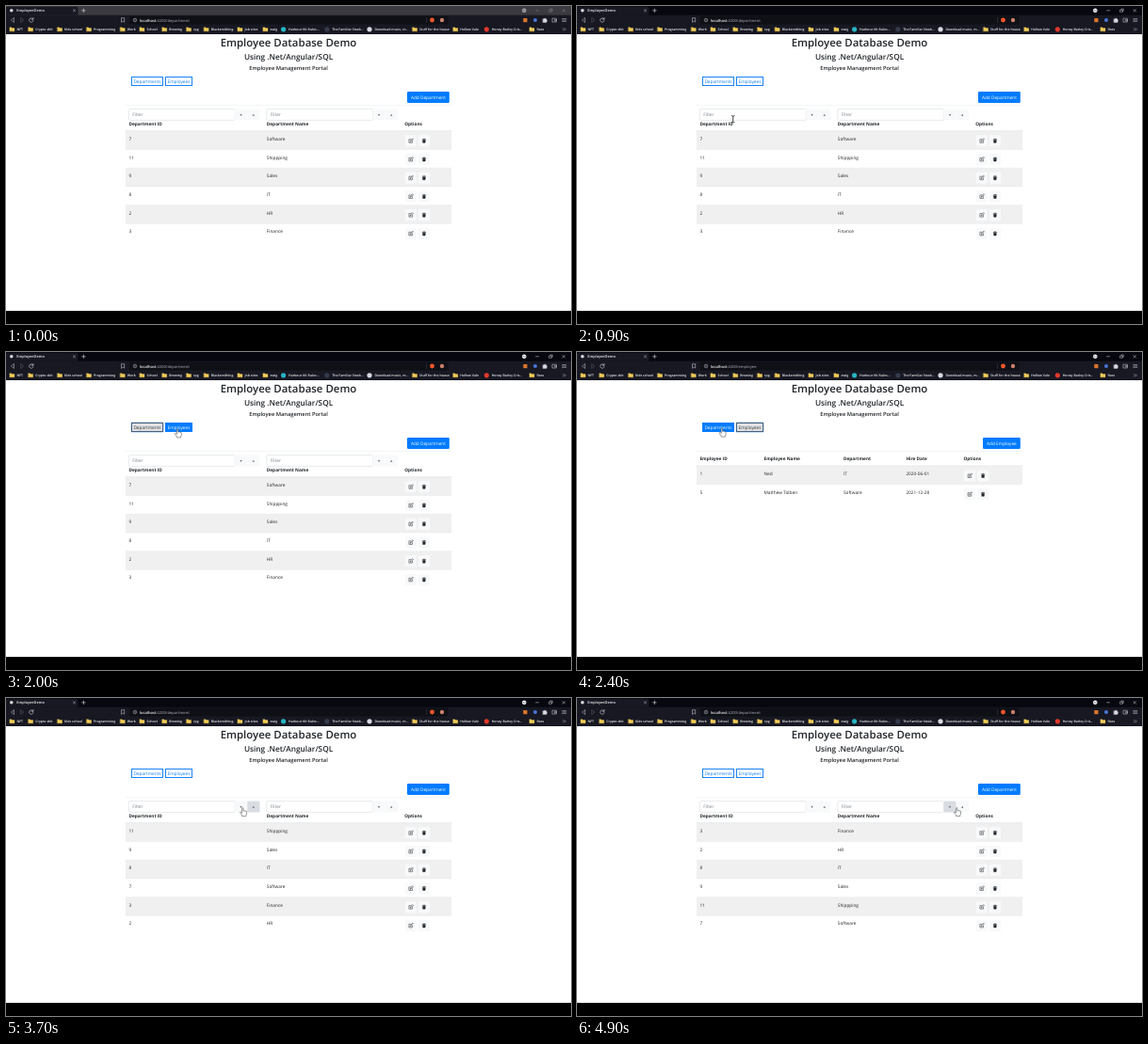
An HTML page for the animation above (5000 ms loop, 600 px wide and 338 px high).

```html
<!DOCTYPE html>
<html lang="en">
<head>
<meta charset="utf-8">
<title>EmployeeDemo</title>
<style>
  html, body { margin: 0; width: 100%; height: 100%; overflow: hidden; background: #fff; }
  svg { display: block; width: 100vw; height: 100vh; }
  text { font-family: "Open Sans", "Noto Sans", sans-serif; text-rendering: geometricPrecision; white-space: pre; }
  #chrome text { font-weight: 600; }
</style>
</head>
<body>
<svg viewBox="0 0 600 338" preserveAspectRatio="none">
  <g id="chrome"></g>
  <g id="page"></g>
  <g id="cursor"></g>
</svg>
<script>
const BLUE = '#007bff', INK = '#212529', LINE = '#dee2e6';
const $ = id => document.getElementById(id);

const rect = (x, y, w, h, fill, extra = '') =>
  `<rect x="${x}" y="${y}" width="${w}" height="${h}" fill="${fill}" ${extra}/>`;
const path = (d, stroke, w = 0.6, fill = 'none') =>
  `<path d="${d}" stroke="${stroke}" stroke-width="${w}" fill="${fill}" stroke-linecap="round" stroke-linejoin="round"/>`;
const dot = (x, y, r, fill, extra = '') => `<circle cx="${x}" cy="${y}" r="${r}" fill="${fill}" ${extra}/>`;
const text = (s, x, y, size = 4.75, fill = INK, extra = '') =>
  `<text x="${x}" y="${y}" font-size="${size}" fill="${fill}" ${extra}>${s}</text>`;
const bold = (s, x, y) => text(s, x, y, 4.75, INK, 'font-weight="700"');
const mid = (s, x, y, size, fill, weight = 400) =>
  text(s, x, y, size, fill, `text-anchor="middle" font-weight="${weight}"`);

// Browser frame
const folder = x => path(`M${x} 22.8h1.9l.6.7h2.5v3.3h-5z`, '#f5d469', 0.3, '#f3cc55');

const folders = [
  [4, 'NFT'], [23.7, 'Crypto shit'], [54.6, 'Kids school'], [85.6, 'Programming'],
  [121.3, 'Work'], [142, 'School'], [165.8, 'Brewing'], [191.6, 'rpg'],
  [210.2, 'Blacksmithing'], [246, 'Job sites'], [273, 'ewig'],
  [431.6, 'Stuff for the house'], [474.8, 'Hollow Vale'], [556, 'fixes']
];
const links = [
  [294.6, '#27b5c4', 'Harbour Kit Rules...'], [340.8, '#343b4d', 'The Familiar Nook...'],
  [386, '#d8dae0', 'Download music, m...'], [510.3, '#e2382c', 'Honey Barley Cris...']
];

function drawChrome(active, route) {
  const strip = active ? '#06070f' : '#3a3a40', bar = '#171822';
  const ctl = active ? '#e0e1e8' : '#8b8b92';
  let s = rect(0, 0, 600, 30, bar) + rect(0, 0, 600, 9.7, strip) +
    path('M0 9.8V2q0-1.2 1.2-1.2H75q1.4 0 1.4 1.4v7.6z', 'none', 0, bar) +
    dot(5.8, 4.8, 1.8, '#d9d9df') + text('EmployeeDemo', 11.3, 6.3, 3.9, '#ececf2') +
    path('M71.4 3.7l2.2 2.2m0-2.2l-2.2 2.2', '#c8c9d2', 0.5) +
    path('M82.4 3v3.6m-1.8-1.8h3.6', '#e0e0e8', 0.6) +
    dot(550.3, 4.8, 2.3, active ? '#f1f1f4' : '#a5a5aa') + path('M549.3 4.4l1 1 1-1', '#23242e', 0.5) +
    path('M562.7 4.8h3', ctl, 0.5) +
    path('M577 4h2.3v2.3h-2.3zM578 4v-1h2.3v2.3h-1', ctl, 0.45) +
    path('M591 3.5l2.6 2.6m0-2.6l-2.6 2.6', ctl, 0.5);

  s += path('M8.2 12.8L5.4 15l2.8 2.2z', '#cfd0d8', 0.5) +
    path('M16 12.8l2.8 2.2-2.8 2.2z', '#62646f', 0.5) +
    path('M28.6 13.7a2.2 2.2 0 1 0 .4 1.9M29 12.5v1.7h-1.7', '#d8d9e0', 0.6) +
    path('M122.9 12.7h2.8v4.4l-1.4-1.1-1.4 1.1z', '#d0d1d9', 0.55) +
    rect(131, 10.6, 338.5, 8.8, '#0f1016', 'rx="1"') +
    dot(137, 15, 1.8, 'none', 'stroke="#c6c7cf" stroke-width=".5"') +
    path('M137 14.8v1M137 14v.05', '#c6c7cf', 0.5) +
    `<text x="141.8" y="16.5" font-size="4.05" fill="#f2f2f6">localhost<tspan fill="#8d8f9b">:4200/${route}</tspan></text>` +
    path('M446.7 12.4v5.2', '#555765', 0.4) +
    dot(452.5, 15, 2.4, '#f4572c') + dot(463, 15, 2.2, '#c7806c') +
    rect(549.3, 13, 4.2, 4.2, '#d9752b') + dot(562, 15, 2, '#4777d9') +
    path('M570.2 13.7h1.2a.8.8 0 0 1 1.6 0h1.1v1.2a.8.8 0 0 1 0 1.5v1h-3.9z', '#d8d9e0', 0.3, '#d8d9e0') +
    path('M580.4 13.2h4v3.8h-4zM582.8 14.6h1.6v1.2h-1.6z', '#d8d9e0', 0.5) +
    path('M590.8 13.6h4M590.8 15h4M590.8 16.4h4', '#d8d9e0', 0.5);

  for (const [x, name] of folders) s += folder(x) + text(name, x + 7.5, 26.2, 3.5, '#f2f2f6');
  for (const [x, color, name] of links) s += dot(x, 24.8, 2.6, color) + text(name, x + 5.4, 26.2, 3.5, '#f2f2f6');
  return s + path('M591.5 23.6l1.1 1.2-1.1 1.2m1.8-2.4l1.1 1.2-1.1 1.2', '#e0e0e8', 0.45);
}

// Page
const names = { 2: 'HR', 3: 'Finance', 7: 'Software', 8: 'IT', 9: 'Sales', 11: 'Shippping' };
const ids = [8, 2, 3, 9, 7, 11];
const byName = (a, b) => names[a] < names[b] ? -1 : 1;
const orders = {
  plain: ids,
  idUp: [...ids].sort((a, b) => a - b),
  idDown: [...ids].sort((a, b) => b - a),
  nameUp: [...ids].sort(byName),
  nameDown: [...ids].sort(byName).reverse()
};
const staff = [
  ['1', 'Ned', 'IT', '2020-06-01'],
  ['5', 'Matthew Tolben', 'Software', '2021-12-28']
];

function navButton(label, x, w, focus, hover) {
  const [fill, stroke, ink] = focus ? ['#e1e1e3', '#47617c', '#33383d']
    : hover ? [BLUE, BLUE, '#fff'] : ['#fff', '#1a82f5', '#0f7cf5'];
  const ring = focus ? rect(x - 0.4, 74.6, w + 0.8, 10.8, '#8fbff2', 'rx="1"') : '';
  return ring + rect(x + 0.5, 75.5, w - 1, 9, fill, `stroke="${stroke}"`) +
    mid(label, x + w / 2, 81.8, 4.75, ink);
}

const addButton = (label, x) => rect(x, 91, 470.8 - x, 12, BLUE, 'rx="1.2"') +
  mid(label, (x + 470.8) / 2, 98.7, 4.75, '#fff');

const rule = (y, w = 0.4) => path(`M127 ${y}H473`, LINE, w);

function tools(x, y) {
  const trash = x + 14.2;
  return rect(x - 6, y - 6, 12, 12, '#f8f9fa', 'rx="1.2"') +
    rect(trash - 6, y - 6, 12, 12, '#f8f9fa', 'rx="1.2"') +
    path(`M${x + 0.2} ${y - 1.6}h-2.1v3.6h3.6v-1.7`, INK, 0.5) +
    path(`M${x - 0.5} ${y + 0.6}l.3-1 2.2-2.2.7.7-2.2 2.2z`, INK, 0.5) +
    path(`M${trash - 1.7} ${y - 1.5}h3.4M${trash - 0.5} ${y - 2}h1`, INK, 0.6) +
    path(`M${trash - 1.3} ${y - 0.7}h2.6l-.2 2.7h-2.2z`, INK, 0.5, INK);
}

function filter(x, first, lit) {
  const w = 112.7;
  let s = rect(x, 109.6, w, 11.8, '#fff', 'rx="1.2" stroke="#ced4da" stroke-width=".5"') +
    text('Filter', x + 3.9, 117.3, 4.75, '#7a828a');
  for (const i of [0, 1]) {
    const bx = x + w + i * 13.2, cx = bx + 6.6;
    s += rect(bx, 109.6, 13.2, 11.8, lit === first + i ? '#d9dde2' : '#f8f9fa', 'rx="1.2"') +
      path(i ? `M${cx - 0.8} 116.6h1.6l-.8-1.3z` : `M${cx - 0.8} 115.2h1.6l-.8 1.3z`, '#343a40', 0.2, '#343a40');
  }
  return s;
}

function departments(order, lit) {
  let s = addButton('Add Department', 426) + rule(105.6) +
    filter(130.4, 0, lit) + filter(276.8, 2, lit) +
    bold('Department ID', 130.4, 127.2) + bold('Department Name', 276.8, 127.2) + bold('Options', 423.2, 127.2);
  orders[order].forEach((id, i) => {
    const y = 132.8 + i * 19.72;
    if (i % 2 === 0) s += rect(127, y, 346, 19.72, '#f0f0f0');
    s += rule(y, i ? 0.35 : 0.7) + text(id, 130.4, y + 10) + text(names[id], 276.8, y + 10) + tools(429.8, y + 10.5);
  });
  return s;
}

function employees() {
  const cols = [130.4, 198.5, 283, 349.4, 410.5];
  let s = addButton('Add Employee', 431) + rule(105.6);
  ['Employee ID', 'Employee Name', 'Department', 'Hire Date', 'Options']
    .forEach((h, i) => { s += bold(h, cols[i], 115.4); });
  staff.forEach((row, i) => {
    const y = 121 + i * 19.72;
    if (i === 0) s += rect(127, y, 346, 19.72, '#f0f0f0');
    s += rule(y, i ? 0.35 : 0.7) + tools(417, y + 10.5);
    row.forEach((v, k) => { s += text(v, cols[k], y + 10); });
  });
  return s;
}

function drawPage({ view, order, focus, hover, lit }) {
  return rect(0, 30, 600, 294, '#fff') + rect(0, 324, 600, 14, '#000') +
    mid('Employee Database Demo', 300, 43.4, 11.45, INK, 600) +
    mid('Using .Net/Angular/SQL', 300, 57.3, 8.25, INK, 600) +
    mid('Employee Management Portal', 300, 67.9, 5.75, INK, 600) +
    navButton('Departments', 133, 34, focus === 'dep', hover === 'dep') +
    navButton('Employees', 169, 29, focus === 'emp', hover === 'emp') +
    (view === 'employee' ? employees() : departments(order, lit));
}

// Cursor shapes, hot spot at 0,0
const shapes = {
  arrow: path('M0 0v7l1.7-1.5 1.2 2.6 1.1-.5-1.2-2.5h2.2z', '#000', 0.5, '#fff'),
  beam: path('M-1.4-3.6q1.4 0 1.4.7v5.8q0 .7-1.4.7M1.4-3.6Q0-3.6 0-2.9M0 2.9q0 .7 1.4.7', '#111', 0.75),
  hand: path('M-.7.6Q-.7-.2 0-.2T.7.6v2.5q.7-.5 1.3.1.7-.4 1.2.2 1.1-.2 1.1.9v1.8q0 1-.7 2v.8H-.6v-.8L-2.4 5.4q-.6-1 .2-1.2.7-.1 1.5.9z', '#333', 0.5, '#fff')
};

// time, x, y, shape
const moves = [
  [700, 174, 167, 'arrow'], [900, 165.7, 120.2, 'beam'], [1200, 164, 116, 'beam'],
  [1300, 160, 105, 'arrow'], [1500, 151, 82, 'hand'], [1800, 151, 81.5, 'hand'],
  [2000, 182, 82, 'hand'], [2200, 181, 82, 'hand'], [2400, 153.8, 81.2, 'hand'],
  [2500, 153.8, 81.2, 'hand'], [2600, 170, 90, 'arrow'], [2900, 249, 118, 'hand'],
  [3300, 249.3, 118, 'hand'], [3500, 261.5, 117, 'hand'], [3600, 261.5, 117, 'hand'],
  [3700, 251.3, 116.8, 'hand'], [4000, 251, 117, 'hand'], [4100, 285, 117, 'beam'],
  [4400, 392, 117.5, 'hand'], [4500, 395.5, 117.5, 'hand'], [4700, 395.5, 117.5, 'hand'],
  [4900, 403.2, 116.7, 'hand']
];

function drawCursor(t) {
  const i = moves.findLastIndex(m => m[0] <= t);
  if (i < 0) return '';
  const a = moves[i], b = moves[i + 1] || a;
  const k = b === a ? 0 : (t - a[0]) / (b[0] - a[0]);
  const at = n => a[n] + (b[n] - a[n]) * k;
  return `<g transform="translate(${at(1)} ${at(2)})">${shapes[a[3]]}</g>`;
}

// Each step changes only what it names
const steps = [
  [0, { view: 'department', order: 'nameDown', focus: '', hover: '', lit: -1, active: false }],
  [700, { active: true }],
  [1500, { hover: 'dep' }],
  [1700, { focus: 'dep' }],
  [1900, { hover: '' }],
  [2000, { hover: 'emp' }],
  [2100, { view: 'employee', focus: 'emp', hover: '' }],
  [2300, { hover: 'dep' }],
  [2500, { view: 'department', order: 'plain', focus: 'dep', hover: '' }],
  [2900, { lit: 0 }],
  [3200, { order: 'idUp', focus: '' }],
  [3700, { order: 'idDown', lit: 1 }],
  [4500, { lit: 2 }],
  [4600, { order: 'nameUp' }]
];

const stateAt = t => Object.assign({}, ...steps.filter(s => s[0] <= t).map(s => s[1]));

const LOOP = 5000, TICK = 100;
const start = performance.now();
let shown = -1;

function frame() {
  const t = Math.floor(((performance.now() - start) % LOOP) / TICK) * TICK;
  if (t !== shown) {
    shown = t;
    const state = stateAt(t);
    $('chrome').innerHTML = drawChrome(state.active, state.view);
    $('page').innerHTML = drawPage(state);
    $('cursor').innerHTML = drawCursor(t);
  }
  requestAnimationFrame(frame);
}
frame();
</script>
</body>
</html>
```
